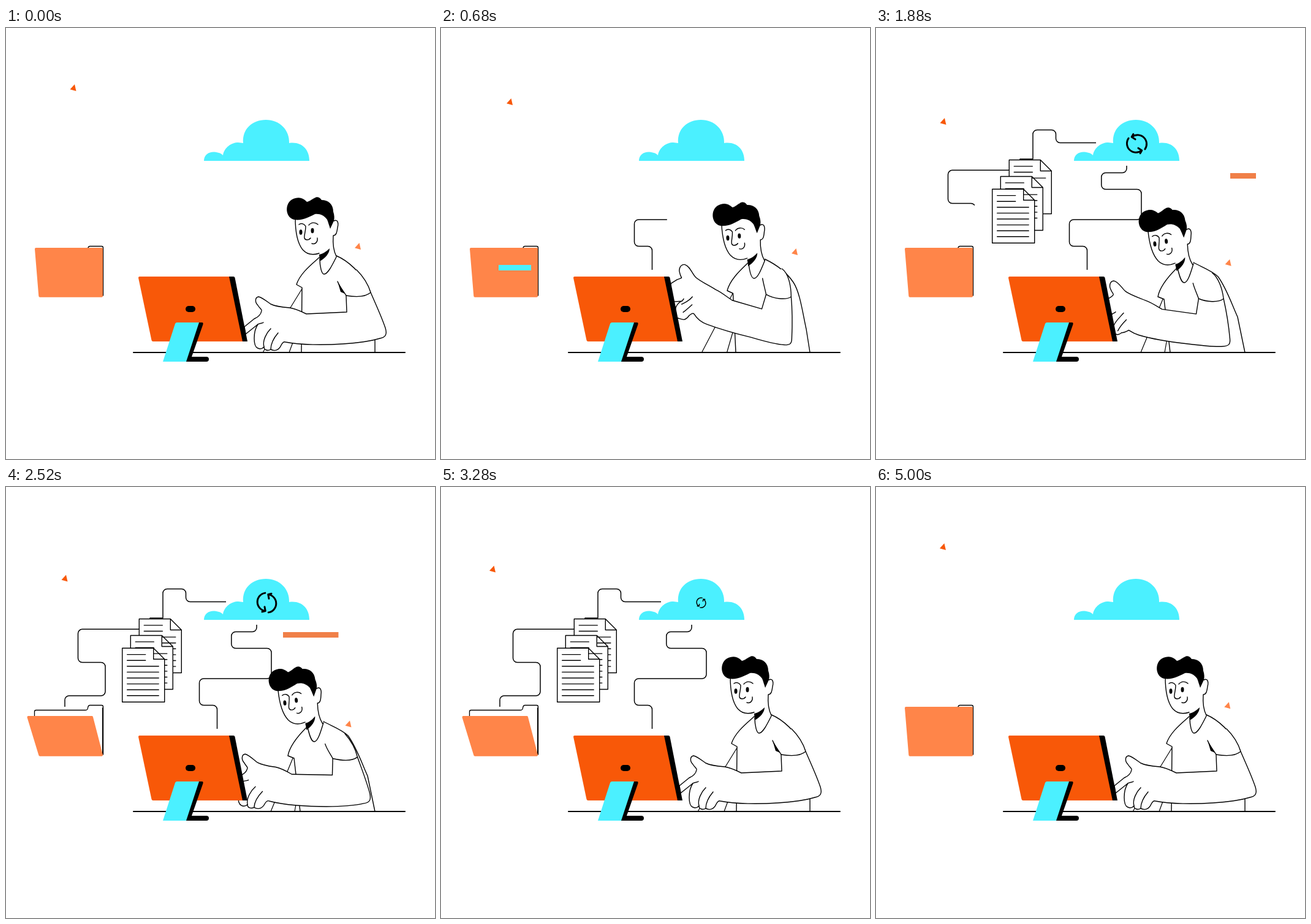
Write an HTML page with a canvas that moves like this. It is 700 px wide and 704 px high and loops after 5040 ms.

```html
<!DOCTYPE html>
<html lang="en">
<head>
<meta charset="utf-8">
<title>Cloud file sync</title>
<style>
html, body { margin: 0; width: 100%; height: 100%; overflow: hidden; background: #fff; }
canvas { display: block; width: 700px; height: 704px; }
</style>
</head>
<body>
<canvas id="stage" width="700" height="704"></canvas>
<script>
const ctx = document.getElementById('stage').getContext('2d');
const LOOP = 5040, STEP = 40;
const ORANGE = '#f85808', PEACH = '#ff8549', CYAN = '#4bf0ff';

// Timing helpers
const ramp = (t, a, b) => Math.min(1, Math.max(0, (t - a) / (b - a)));
const smooth = (t, a, b) => { const k = ramp(t, a, b); return k * k * (3 - 2 * k); };
const pulse = (t, a, b, c, d, f = smooth) => f(t, a, b) - f(t, c, d);
const mix = (a, b, k) => a + (b - a) * k;

// Shape helpers: paths keep their commands while their points are blended
const NUMBER = /-?[\d.]+/g;
const points = s => s.match(NUMBER).map(Number);
const blend = (a, b, k) => a.map((v, i) => mix(v, b[i], k));
const build = (template, pts) => { let i = 0; return new Path2D(template.replace(NUMBER, () => pts[i++])); };
const morph = (a, b, k) => build(a, blend(points(a), points(b), k));

function turn(pts, deg, cx, cy, dx, dy) {
  const c = Math.cos(deg * Math.PI / 180), s = Math.sin(deg * Math.PI / 180);
  return pts.map((v, i) => {
    const x = pts[i & ~1] - cx, y = pts[i | 1] - cy;
    return i & 1 ? cy + x * s + y * c + dy : cx + x * c - y * s + dx;
  });
}

function draw(path, fill, stroke, width = 1.4) {
  const p = typeof path === 'string' ? new Path2D(path) : path;
  if (fill) { ctx.fillStyle = fill; ctx.fill(p); }
  if (stroke) { ctx.strokeStyle = stroke; ctx.lineWidth = width; ctx.stroke(p); }
}

// Connecting wires: [x, y, sharp corner?]
const UPLOAD = [[344.5, 395], [344.5, 356.5], [315.5, 356.5], [315.5, 313], [433, 313],
  [433, 263.5], [367.8, 263.5], [367.8, 236.5], [409, 236.5], [409, 225]];
const DOWNLOAD = [[359, 187.5], [293.5, 187.5], [293.5, 166.5], [256, 166.5], [256, 214, 1], [235, 214, 1],
  [235, 232.3, 1], [117.5, 232.3], [117.5, 286.5], [162, 286.5], [162, 341], [96, 341], [96, 359]];

function wire(pts, amount) {
  if (amount <= 0) return;
  const r = 7, path = new Path2D();
  let length = 0;
  path.moveTo(...pts[0]);
  for (let i = 1; i < pts.length; i++) {
    const [x, y, sharp] = pts[i], next = pts[i + 1];
    length += Math.abs(x - pts[i - 1][0]) + Math.abs(y - pts[i - 1][1]);
    if (next && !sharp) {
      path.arcTo(x, y, next[0], next[1], r);
      length -= r * (2 - Math.PI / 2);
    } else path.lineTo(x, y);
  }
  ctx.setLineDash([length * amount, 2000]);
  draw(path, null, '#000', 1.5);
  ctx.setLineDash([]);
}

// Drifting triangles: closed curves through [time, x, y]
const DRIFT_LEFT = [[0, 109.5, 97.5], [680, 112, 120.5], [1320, 113, 141], [1760, 111.5, 152],
  [2520, 95.5, 149], [3280, 84, 134], [4000, 89.5, 117]];
const DRIFT_RIGHT = [[0, 574, 356.5], [680, 577, 365.5], [1320, 578.5, 374], [1760, 577, 382],
  [2520, 558.5, 387], [3280, 546, 383], [4000, 547, 376]];

function drift(keys, t, color) {
  const n = keys.length;
  const key = i => {
    const k = keys[(i + n) % n];
    return [k[0] + LOOP * Math.floor(i / n), k[1], k[2]];
  };
  let i = n - 1;
  while (keys[i][0] > t) i--;
  const [p, a, b, q] = [key(i - 1), key(i), key(i + 1), key(i + 2)];
  const span = b[0] - a[0], u = (t - a[0]) / span;
  const at = c => {
    const m0 = (b[c] - p[c]) / (b[0] - p[0]) * span, m1 = (q[c] - a[c]) / (q[0] - a[0]) * span;
    return a[c] + u * (m0 + u * (3 * (b[c] - a[c]) - 2 * m0 - m1 + u * (2 * (a[c] - b[c]) + m0 + m1)));
  };
  ctx.save();
  ctx.translate(at(1), at(2));
  draw('M2.5-5.5L5 5.5L-5 2.8Z', color);
  ctx.restore();
}

function sheet(x, y, size, lines) {
  if (size <= 0) return;
  ctx.save();
  ctx.translate(x, y);
  ctx.scale(size, size);
  draw('M0 0H-69V-88H-18L0-70Z M-18-88V-70H0', '#fff', '#000');
  for (let i = 0; i < 8; i++) {
    const k = ramp(lines * 8, i, i + 1);
    if (k) draw(`M-61 ${-77.6 + i * 9.6}h${(i < 2 ? 30 : 51.5) * k}`, null, '#000', 1.4);
  }
  ctx.restore();
}

function cloud(t) {
  draw('M323 217C323 207 331 202 340 202.5C346 203 352 205 354 208C356 195 368 187 379 187L387 188' +
    'C385 165 402 150 424 150C447 150 463 167 462 188C482 185 495 198 495 217Z', CYAN);
  const size = pulse(t, 1080, 1280, 3120, 3440);
  if (size <= 0) return;
  ctx.save();
  ctx.translate(mix(423.5, 425.5, size), 189);
  ctx.rotate(-(t - 1320) * 250 / 1200 * Math.PI / 180);
  ctx.scale(size, size);
  for (let i = 0; i < 2; i++) {
    draw('M14-8A14.8 14.8 0 0 0-13.5 2 M-16.5-2L-13.5 2.5L-7.5-1', null, '#000', 3);
    ctx.rotate(Math.PI);
  }
  ctx.restore();
}

function folder(open) {
  const left = mix(56, 46.5, open);
  draw(`M${left} 376V367Q${left} 364.5 ${left + 2.5} 364.5H130Q133 364.5 133.5 361Q134 356.5 137 356.5` +
    'H156Q158.5 356.5 158.5 359V437', '#fff', '#000', 1.3);
  draw('M158 361V436', null, '#000', 2);
  const front = morph('M49 361L156 361L156 437.7L55.3 437.7Z', 'M36.5 376L140 376L156 437.7L55.3 437.7Z', open);
  draw(front, PEACH, PEACH, 4);
}

function bar(color, x, y, from, to) {
  ctx.fillStyle = color;
  if (to > from) ctx.fillRect(x + from, y, to - from, 9);
}

// Person
const BACK_ARM = ['M483 426L419 530L462 530L484 470', 'M468 443L432 530L471 530L478 490'];
const TORSO = [
  'M512 374C500 385 480 400 474 419L483 424L482 530L602 530L602 512C600 480 600 440 592 425C580 400 558 380 539 372',
  'M490 393C478 405 463 422 460 439L470 443L480 530L602 530L590 472C580 450 572 425 558 406C546 395 530 390 518 383'];
const COLLAR = ['M512 377C512 390 515 402 519 402C525 402 532 388 539 374', 'M492 392C495 405 498 416 503 416C509 416 514 398 518 385'];
const ARMPIT = ['M541 414L553 434L546 431Z', 'M521 422L533 444L527 433Z'];
const ARM_REST = 'M541 414C545 424 551 430 555 437L556 464L490 467C480 462 470 458 463 457C450 456 440 455 432 451' +
  'C426 447 418 440 412 439C406 440 406 448 411 453C414 458 418 460 417 462C416 468 412 472 405 475L389 488L391 500L411 484' +
  'C403 496 403 520 411 523C415 525 418 524 421 521C421 526 427 528 432 525C440 529 446 525 449 518C451 514 453 512 456 513' +
  'C480 518 520 518 550 516C580 514 600 510 610 507C620 505 622 500 619 490C613 472 605 455 595 432C590 415 580 403 572 395';
const ARM_RAISED = 'M515 415C517 424 520 433 522 441L516 465L467 453C457 447 448 440 440 437C428 430 415 425 406 418' +
  'C400 413 396 400 387 398C380 398 377 406 380 413C381 417 383 419 383 420C380 422 378 422 376 423L366 430L366 460L385 458' +
  'C372 464 372 485 380 486C384 487 387 488 390 488C393 487 396 484 398 481C401 478 404 476 406 478C410 484 418 491 428 494' +
  'C450 501 475 507 500 512C520 517 540 522 555 522C564 522 567 520 567 512C567 490 566 465 563 443C562 425 557 405 546 398';
const CREASES_REST = 'M595 432C585 441 567 439 555 437M432 491C425 498 418 511 421 521M444 498C438 505 432 515 432 525M420 481C417 483 414 482 411 484';
const CREASES_RAISED = 'M563 443C555 449 535 448 522 441M402 450C396 458 390 460 385 463M402 463C397 468 392 473 388 476M388 454C387 456 386 457 385 458';

function head(lean) {
  ctx.save();
  ctx.translate(512 - 22.5 * lean, 372 + 16 * lean);
  ctx.rotate(-5.5 * lean * Math.PI / 180);
  ctx.translate(-512, -372);
  draw('M472 310L511 368L512 378L537 372L535 315Z', '#fff');
  draw('M472 310C472 335 476 352 484 362C492 371 502 371 511 368' +
    'M539 373C535 365 533 352 534 339C539 339 540 333 541 326C543 318 541 312 535 315', '#fff', '#000');
  draw('M511 370C517 369 523 365 528 360C528 368 521 376 512 381Z', '#000');
  draw('M470 313C454 309 454 282 472 278C480 276 485 278 491 284C496 283 500 279 503 278C507 275 512 276 515 281' +
    'C526 281 534 288 534 300C536 306 536 311 535 315L529 328C527 322 526 318 524 313C519 306 512 303 504 304C494 309 484 315 470 313Z', '#000');
  draw('M478 321C482 318 487 320 489 324C489 333 486 339 487 343C488 347 494 347 497 343' +
    'M494 322C498 317 505 317 509 321M499 352C504 354 509 350 508 343', null, '#000');
  for (const [x, y] of [[481, 333.5], [500, 331]]) {
    ctx.beginPath();
    ctx.ellipse(x, y, 2.5, 4.2, 0, 0, 7);
    ctx.fillStyle = '#000';
    ctx.fill();
  }
  ctx.restore();
}

function person(t) {
  const lean = pulse(t, 240, 1120, 2640, 3240);
  const raise = pulse(t, 120, 560, 1640, 2200);
  const arm = (rest, raised) => build(rest, blend(
    turn(points(rest), 3.7 * lean, 619, 500, -26 * lean, 10.5 * lean),
    turn(points(raised), 5 * (1 - lean), 565, 520, 10 * (1 - lean), -8 * (1 - lean)), raise));

  draw(morph(...BACK_ARM, lean), '#fff', '#000', 1.2);
  draw(morph(...TORSO, lean), '#fff', '#000');
  head(lean);
  draw(morph(...COLLAR, lean), null, '#000');
  draw(arm(ARM_REST, ARM_RAISED), '#fff', '#000');
  draw(arm(CREASES_REST, CREASES_RAISED), null, '#000');
  if (lean + raise < 0.5) draw(morph(...ARMPIT, lean), '#000');
}

function desk() {
  draw('M208 530H651', null, '#000', 2);
  draw('M363 406H371Q373 406 373.5 408L394 512H385Z', '#000');
  draw('M218 406H364L386 512H240Q238 512 237.5 510L216 408Q216 406 218 406Z', ORANGE);
  draw('M298 454H304A5 5 0 0 1 304 464H298A5 5 0 0 1 298 454Z', '#000');
  draw('M314 481H320Q322 481 321.5 484L303 537H327A4 4 0 0 1 327 545H293Z', '#000');
  draw('M279 481H315L294 545H256L276 483Q277 481 279 481Z', CYAN);
}

function render(t) {
  ctx.fillStyle = '#fff';
  ctx.fillRect(0, 0, 700, 704);
  ctx.lineJoin = ctx.lineCap = 'round';

  drift(DRIFT_LEFT, t, ORANGE);
  drift(DRIFT_RIGHT, t, PEACH);
  ctx.lineCap = 'butt';
  wire(UPLOAD, pulse(t, 400, 1120, 3440, 3920, ramp));
  wire(DOWNLOAD, pulse(t, 1120, 2120, 3980, 4680, ramp));
  ctx.lineCap = 'round';
  cloud(t);

  [[286.3, 303.5], [272.3, 330.5], [258.7, 351.2]].forEach(([x, y], i) => {
    const shown = 1200 + (2 - i) * 160, gone = 3880 + i * 160;
    sheet(x, y, pulse(t, shown, shown + 215, gone, gone + 360),
      pulse(t, shown + 215, shown + 560, gone - 200, gone + 5, ramp));
  });

  folder(pulse(t, 2000, 2240, 3640, 3920));
  bar(CYAN, 94, 387, 116 * ramp(t, 1000, 1500), 116 * ramp(t, 440, 965));
  bar('#f08048', 452, 237, 168 - 168 * ramp(t, 1760, 2240), 168 - 168 * ramp(t, 2280, 2800));
  person(t);
  desk();
}

function tick(now) {
  render(Math.floor(now % LOOP / STEP) * STEP);
  requestAnimationFrame(tick);
}
render(0);
requestAnimationFrame(tick);
</script>
</body>
</html>
```
